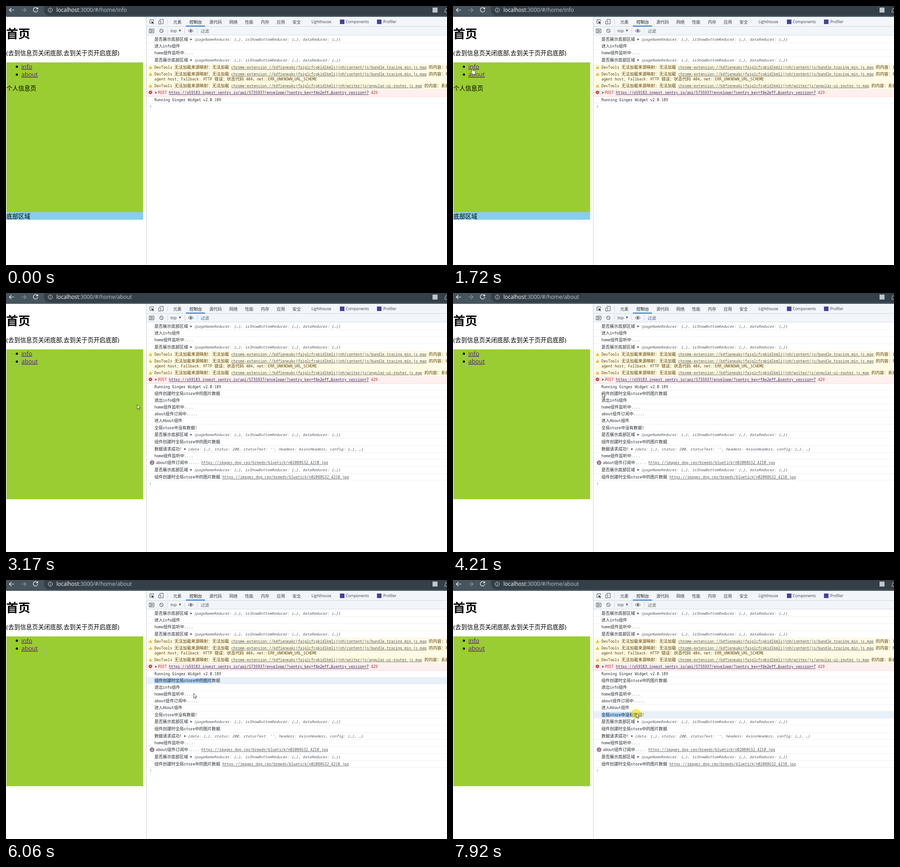
Write an HTML page that moves like this. It is 976x574 px and loops after 8 s.

```html
<!DOCTYPE html>
<html lang="zh">
<head>
<meta charset="utf-8">
<style>
html, body { margin: 0; width: 100%; height: 100%; overflow: hidden; background: #fff; }
svg { display: block; width: 976px; height: 574px; }
text { white-space: pre; font-family: "Open Sans", "Noto Sans CJK SC", sans-serif; }
.mono { font-family: "Noto Sans Mono", "Noto Sans CJK SC", monospace; font-size: 8.2px; }
.mono .zh { font-size: 9.3px; }
.url { text-decoration: underline; fill: #545454; }
.error .url { fill: #2b2b55; }
.obj { font-style: italic; fill: #50565c; }
.line { fill: none; stroke: #4a5057; }
</style>
</head>
<body>
<svg viewBox="0 0 976 574">
  <g id="page"></g>
  <g id="log"></g>
  <path id="prompt" d="M318.5-2.2l2.4 2.2-2.4 2.2" fill="none" stroke="#3b87e0"/>
  <g id="browser"></g>
  <g id="pointer">
    <circle id="press" cy="1.5" r="11" fill="#f5e400" opacity=".6"/>
    <path id="arrow" d="M.4.4V10.3L2.6 8.2 4.3 12 6 11.2 4.3 7.6H7.4Z" fill="#fff" stroke="#222" stroke-width=".8"/>
    <path id="hand" d="M-1 1Q0-.6 1.2 1V5L5.6 6Q7.2 6.4 7 8.2L6 11.4V13.6H-.2V12L-3 8.4Q-3.2 6.6-1 7.6Z" fill="#fff" stroke="#222" stroke-width=".8"/>
  </g>
</svg>
<script>
const $ = id => document.getElementById(id);
const LEFT = 328.5, ZH = /[\u3000-\u9fff\uff00-\uffef]/;
const charWidth = c => ZH.test(c) ? 9.3 : 4.92;
const textWidth = s => [...s].reduce((w, c) => w + charWidth(c), 0);
const show = (id, on) => $(id).setAttribute('display', on ? 'inline' : 'none');
const rect = (x, y, w, h, fill, more = '') =>
  `<rect x="${x}" y="${y}" width="${w}" height="${h}" fill="${fill}" ${more}/>`;
const stroke = (d, more = '') => `<path class="line" d="${d}" ${more}/>`;
const label = (x, y, s, size, fill = '#000', more = '') =>
  `<text x="${x}" y="${y + size * .36}" font-size="${size}" fill="${fill}" ${more}>${s}</text>`;

function mono(x, y, s, fill, cls = '') {
  const html = s.replace(/&/g, '&amp;')
    .replace(/(https|chrome-extension):\S+/g, '<tspan class="url">$&</tspan>')
    .replace(/[\u3000-\u9fff\uff00-\uffef]+/g, '<tspan class="zh">$&</tspan>');
  return `<text class="mono ${cls}" x="${x}" y="${y + 3}" fill="${fill}">${html}</text>`;
}
const triangle = (x, y) => `<path d="M${x} ${y - 2.4}l4.6 2.4-4.6 2.4z" fill="#5a5f65"/>`;

// Web page
const link = (y, s) => `<circle cx="24" cy="${y + .5}" r="2.5"/>` +
  label(34, y, s, 13.27, '#551a8b', 'text-decoration="underline"');
$('page').innerHTML =
  label(0.5, 61, '首页', 26.5, '#000', 'font-weight="700"') +
  label(0.8, 104, '(去到信息页关闭底部,去到关于页开启底部)', 13.27) +
  rect(1, 125, 302.5, 332, '#9acd32') + link(134, 'info') + link(151.5, 'about') +
  `<g id="info">${label(0.8, 182, '个人信息页', 13.27)}
  ${rect(1, 457, 302.5, 16.7, '#87ceeb')}${label(0.8, 466, '底部区域', 13.27)}</g>`;

// Console rows: centre y, text, object preview, kind
const EXT = 'chrome-extension://kdfieneakcjfaiglcfcgkidlkmlijjnh/';
const MAP = 'DevTools 无法加载来源映射：无法加载 ' + EXT;
const DOG = 'https://images.dog.ceo/breeds/bluetick/n02088632_4210.jpg';
const STATE = '{pageNameReducer: {…}, isShowBottomReducer: {…}, dataReducer: {…}}';
const SHOWN = '是否展示底部区域', CREATED = '组件创建时全局store中的图片数据';
const HOME = 'home组件监听中....', EMPTY = '全局store中没有数据!';
const rows = [
  [74, SHOWN, STATE], [89, '进入info组件'], [104, HOME], [120, SHOWN, STATE],
  [136, MAP + 'content/js/bundle.tracing.min.js.map 的内容：系统', , 'warn'],
  [151, MAP + 'content/js/bundle.tracing.min.js.map 的内容：Fetch', , 'warn'],
  [177, MAP + 'writer/js/angular-ui-router.js.map 的内容：系统错', , 'warn'],
  [192, 'POST https://o59183.ingest.sentry.io/api/5735937/envelope/?sentry_key=f4e2eff…&sentry_version=7 429', , 'error'],
  [208, 'Running Ginger Widget v2.0.189'],
  [223, CREATED], [238, '退出info组件'], [253, HOME], [268, 'about组件订阅中.....'],
  [283, '进入About组件'], [298.5, EMPTY], [314, SHOWN, STATE], [329.5, CREATED],
  [346, '数据请求成功!', "{data: {…}, status: 200, statusText: '', headers: AxiosHeaders, config: {…}, …}"],
  [361, HOME], [376, 'about组件订阅中..... ' + DOG, , 'count'],
  [392, SHOWN, STATE], [408, CREATED + ' ' + DOG], [422.5]
];
const styles = {
  warn: ['#fffbe5', '#fff3c4', '#5c3c00'],
  error: ['#fff0f0', '#ffd6d6', '#c5221f'],
  plain: ['none', '#eef0f3', '#23282d']
};
const icons = {
  warn: y => `<path d="M319.8 ${y - 4}l3.8 7.2h-7.6z" fill="#e0b400"/>` +
    stroke(`M319.8 ${y - 1.5}v2.4m0 .7v.9`, 'style="stroke:#fff"'),
  error: y => `<circle cx="319.6" cy="${y - .5}" r="3.7" fill="#c9302c"/>` +
    stroke(`M318.2 ${y - 1.9}l2.8 2.8m0-2.8l-2.8 2.8`, 'style="stroke:#fff"') + triangle(330, y),
  count: y => `<circle cx="323.3" cy="${y}" r="5.2" fill="#94808f"/>` + label(321.2, y, '2', 7.5, '#fff')
};

function row([y, text, obj, kind], i) {
  const [bg, border, ink] = styles[kind] || styles.plain;
  const top = y - 7.5, bottom = rows[i + 1][0] - 7.5;
  const x = { error: 336, count: 332 }[kind] || LEFT;
  const end = x + textWidth(text);
  return `<g id="row${i}">` + rect(311, top, 665, bottom - top, bg, `id="bg${i}"`) +
    rect(311, bottom - .5, 665, 1, border) +
    rect(LEFT, y - 5, 0, 10.5, '#a9d1fb', `id="sel${i}"`) +
    (icons[kind] ? icons[kind](y) : '') + mono(x, y, text, ink, kind) +
    (obj ? triangle(end + 5, y) + mono(end + 13, y - .5, obj, '#50565c', 'obj') : '') +
    (i == 5 ? mono(LEFT, 162, 'agent host; Fallback: HTTP 错误：状态代码 404，net::ERR_UNKNOWN_URL_SCHEME', ink) : '') +
    '</g>';
}
const last = rows.length - 1;
$('log').innerHTML = rows.slice(0, last).map(row).join('');

// Browser bar and panel toolbars
const tabs = [[370, '元素'], [406, '控制台'], [450, '源代码'], [494, '网络'], [529, '性能'], [564, '内存'],
  [599, '应用'], [634, '安全'], [676, 'Lighthouse'], [752, 'Components'], [835, 'Profiler']];
const white = 'style="stroke:#fff;stroke-width:1.2"';
$('browser').innerHTML =
  rect(0, 0, 976, 24, '#46545e') + rect(84, -6, 920, 27, '#343f47', 'rx="12"') +
  stroke('M18 9H7.5M12 4.3L7.3 9 12 13.7', white) +
  stroke('M34 9H44M39.5 4.3L44.2 9l-4.7 4.7', 'style="stroke:#94a0a8;stroke-width:1.2"') +
  stroke('M69.6 5.6A5 5 0 1 0 70.4 9M70.4 3V6.4H67', white) +
  `<circle cx="98" cy="9" r="4.6" fill="none" stroke="#dfe4e8"/>` +
  stroke('M98 8.3v3.2M98 6.2v1.2', 'style="stroke:#dfe4e8"') +
  label(111.5, 9, 'localhost<tspan fill="#bcc5cb">:3000/#/home/<tspan id="route"></tspan></tspan>', 12, '#fff') +
  rect(944, 3.5, 11, 11, '#bfc7cd') + stroke('M976 6h-3l-2 8h5', 'style="stroke:#bfc7cd"') +
  rect(310, 24, 1, 550, '#cbd0d5') + rect(311, 24, 665, 40.5, '#f2f5f9') +
  rect(311, 45, 665, 1, '#d3d9df') + rect(311, 64, 665, 1, '#d3d9df') +
  rect(398, 43.5, 42.5, 2, '#1a73d1') +
  tabs.map(([x, s], i) => label(x, 35.3, s, ZH.test(s) ? 9.3 : 8.5, i == 1 ? '#111' : '#3a4047')).join('') +
  rect(739, 30, 10, 10, '#44419b') + rect(821, 30, 10, 10, '#44419b') +
  stroke('M321.5 38.5h-3v-8h8v3') +
  '<path d="M321.5 33.5l6.5 2.7-2.6 1 2 2.3-1 .9-2-2.4-1.3 2.4z" fill="#3a4047"/>' +
  stroke('M340.5 31V29.5h7.5v10h-4M338 33h4.5v7H338z') +
  stroke('M357.5 29v12M357.5 49v12M395.5 49v12M423.5 49v12', 'style="stroke:#cfd5db"') +
  stroke('M317 51h10.5v8.5H317zM320 51v8.5M322.5 53l3 2.2-3 2.2z') +
  '<circle cx="344" cy="55" r="4" class="line"/>' + stroke('M341.2 52.2l5.6 5.6') +
  label(364, 55, 'top', 8.8, '#3a4047') + '<path d="M382.5 52.5h5l-2.5 4.5z" fill="#4a5057"/>' +
  stroke('M403.5 55Q409 48.5 414.5 55 409 61.5 403.5 55z') + '<circle cx="409" cy="55" r="1.9" fill="#4a5057"/>' +
  label(431, 55.3, '过滤', 9.3, '#555c63');

// Pointer path: time, x, y
const path = [
  [130, 848, 550], [270, 600, 455], [410, 385, 364], [550, 250, 305], [690, 150, 253], [760, 112, 222],
  [830, 75, 179], [900, 70, 168], [1030, 56, 150], [1170, 39, 135], [1360, 39, 135], [1540, 33, 125],
  [1860, 51, 148.5], [2470, 51, 148.5], [2680, 75, 178], [2880, 145, 232], [3020, 216, 275],
  [3166, 290, 247], [3300, 365, 233], [3400, 393, 227], [3600, 375, 225], [3870, 334, 228],
  [4210, 330, 221.5], [4550, 330, 221.5], [4891, 384, 221], [5380, 457, 221.5], [5510, 457, 222],
  [5790, 415, 246], [5920, 415, 246], [6064, 415, 251], [6200, 418, 259], [6450, 375, 274],
  [6760, 336, 280], [7050, 331.5, 293.5], [7310, 331.5, 293.5], [7925, 405, 295]
];
function pointAt(t) {
  const i = path.findIndex(p => p[0] > t);
  if (i < 0) return path.at(-1).slice(1);
  if (!i) return path[0].slice(1);
  const [a, b] = [path[i - 1], path[i]], k = (t - a[0]) / (b[0] - a[0]);
  return [1, 2].map(n => a[n] + (b[n] - a[n]) * k);
}

// Selected width, snapped to the nearest character edge
function snap(text, x) {
  let w = 0;
  for (const c of text) {
    if (w + charWidth(c) / 2 > x - LEFT) break;
    w += charWidth(c);
  }
  return w;
}
function select(i, on, x) {
  $('bg' + i).setAttribute('fill', on ? '#e9f0f9' : 'none');
  $('sel' + i).setAttribute('width', on ? snap(rows[i][1], x) : 0);
}

const STEP = 69;
function draw(now) {
  const t = 130 + Math.floor((now % 8000 - 116) / STEP) * STEP;
  const [x, y] = pointAt(t);
  const between = (a, b) => t >= a && t < b;

  const about = t >= 2320;
  $('route').textContent = about ? 'about' : 'info';
  show('info', !about);

  const count = t < 2320 ? 9 : t < 2740 ? 17 : last;
  for (let i = 9; i < last; i++) show('row' + i, i < count);
  $('prompt').setAttribute('transform', `translate(0 ${rows[count][0]})`);

  select(9, between(4600, 7370), pointAt(Math.min(t, 5400))[0]);
  select(14, t >= 7370, x);

  const hand = between(1010, 2600);
  show('pointer', t >= 130);
  show('hand', hand);
  show('arrow', !hand);
  show('press', between(2250, 2320) || between(4600, 5500) || t >= 7370);
  $('pointer').setAttribute('transform', `translate(${x} ${y})`);
}
let start;
requestAnimationFrame(function loop(now) {
  start ??= now;
  draw(now - start);
  requestAnimationFrame(loop);
});
</script>
</body>
</html>
```
